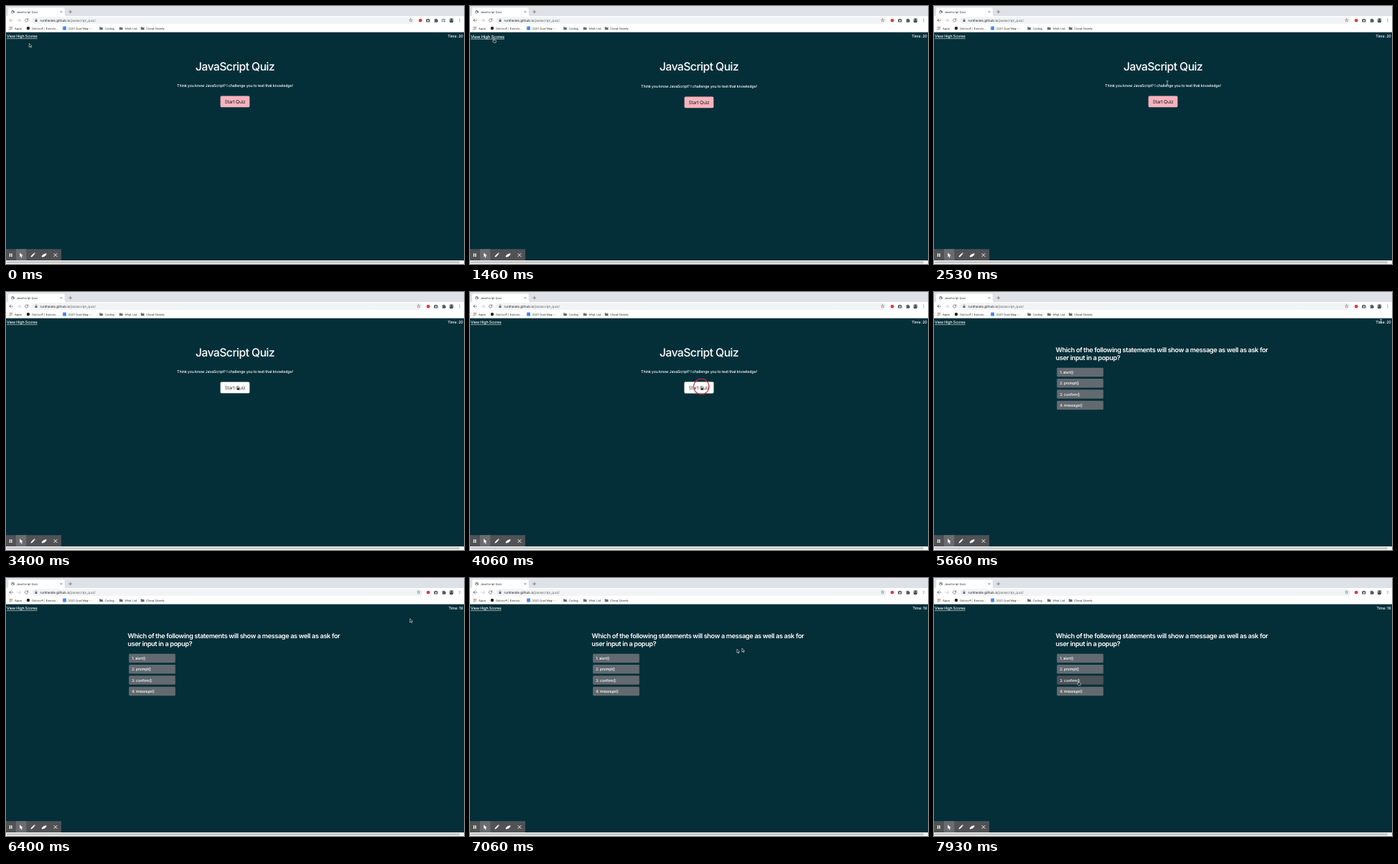
Recreate the animation shown at these times as an HTML page. Size 640 by 360 pixels, loop 8 s.

```html
<!DOCTYPE html>
<html lang="en">
<head>
<meta charset="utf-8">
<title>JavaScript Quiz</title>
<style>
  html, body { margin: 0; width: 100%; height: 100%; overflow: hidden; background: #042f39; }
  svg { display: block; width: 100%; height: 100%; }
  text { font-family: Inter, Roboto, sans-serif; text-rendering: geometricPrecision; white-space: pre; }
  .body { font-size: 5.33px; font-weight: 500; letter-spacing: -.026em; fill: #fff; }
  .ui { font-size: 4px; fill: #303337; }
  .line { fill: none; stroke: #5f6368; stroke-width: .7; stroke-linecap: round; stroke-linejoin: round; }
</style>
</head>
<body>
<svg id="stage" viewBox="0 0 640 360" xmlns="http://www.w3.org/2000/svg"></svg>
<script>
const LOOP = 8000;
const QUIZ_AT = 4200;
const $ = id => document.getElementById(id);

const text = (x, y, str, attrs = 'class="ui"') => `<text x="${x}" y="${y}" ${attrs}>${str}</text>`;
const rect = (x, y, w, h, fill, attrs = '') =>
  `<rect x="${x}" y="${y}" width="${w}" height="${h}" fill="${fill}" ${attrs}/>`;
const circle = (x, y, r, fill, attrs = '') =>
  `<circle cx="${x}" cy="${y}" r="${r}" fill="${fill}" ${attrs}/>`;
const line = (d, attrs = '') => `<path class="line" d="${d}" ${attrs}/>`;
const shape = (d, fill, attrs = '') => `<path d="${d}" fill="${fill}" ${attrs}/>`;

const appGrid = (x, y) => {
  const colors = ['#e8574a', '#e8574a', '#3fa65c', '#f0b429', '#4a86e8'];
  let out = '';
  for (let i = 0; i < 9; i++)
    out += rect(x + i % 3 * 1.5, y + Math.floor(i / 3) * 1.5, 1.1, 1.1, colors[i % colors.length]);
  return out;
};

const folder = x => shape(`M${x} 29.2h1.8l.6.7h2.4v3.4h-4.8z`, '#6b7075');

const star = (cx, cy, r) => {
  const pts = Array.from({ length: 10 }, (_, i) => {
    const a = -Math.PI / 2 + i * Math.PI / 5, k = i % 2 ? r * .45 : r;
    return `${(cx + k * Math.cos(a)).toFixed(2)} ${(cy + k * Math.sin(a)).toFixed(2)}`;
  });
  return line(`M${pts.join('L')}z`, 'style="stroke-width:.5"');
};

function browser() {
  return rect(0, 0, 640, 14, '#dee1e6') +
    shape('M1 14Q3 14 3 12V4.5Q3 2.5 5 2.5H80Q82 2.5 82 4.5V12Q82 14 84 14z', '#fff') +
    circle(9.5, 8.2, 2.3, '#5f6368') +
    shape('M8 7.2q1.2 0 1.4 1t1.3.8l-.5 1.2q-1.6 0-2.4-1.6zM9.6 6.5l1.4.5-.5.9z', '#fff') +
    text(14.4, 9.7, 'JavaScript Quiz') +
    line('M76.1 7.1l2.2 2.2m0-2.2l-2.2 2.2', 'style="stroke-width:.6"') +
    line('M88 8.2h4m-2-2v4') +
    rect(0, 14, 640, 23, '#fff') +
    line('M9.6 20H4.9m2.1-2.2L4.8 20l2.2 2.2', 'id="back"') +
    line('M15.9 20h4.7m-2.1-2.2l2.2 2.2-2.2 2.2', 'style="stroke:#b9bcbf"') +
    line('M30.3 18.6a2.2 2.2 0 1 0 .5 1.7M30.8 17.6v1.5h-1.5') +
    rect(36, 15.2, 546, 9.6, '#f1f3f4', 'id="pill" rx="4.8"') +
    rect(40.6, 19.4, 3, 2.5, '#5f6368', 'rx=".3"') +
    line('M41.2 19.4v-.8a.9.9 0 0 1 1.8 0v.8', 'style="stroke-width:.5"') +
    text(47.4, 21.6, 'runtheisle.github.io<tspan fill="#5f6368">/javascript_quiz/</tspan>',
      'font-size="4.67" letter-spacing="-.01" fill="#202124"') +
    '<g id="tools">' +
      star(576.6, 20, 2.4) +
      circle(590, 20.2, 2.4, '#dc3c42') +
      shape('M598 18.6h1.2l.6-.8h1.8l.6.8h1.2v3.8H598z', '#5f6368') + circle(600.7, 20.5, 1, '#fff') +
      shape('M609.5 18.5h1.4a.9.9 0 0 1 1.8 0h1.4v1.4a.9.9 0 0 1 0 1.8v1.1h-4.6v-1.2a.9.9 0 0 0 0-1.7z', '#55595d') +
    '</g>' +
    `<g id="media">${line('M608.8 18.4h4m-4 1.6h3m-3 1.6h2M613.2 18.4v3.2')}${circle(612.5, 21.7, .8, '#5f6368')}</g>` +
    circle(622.4, 20, 3.2, '#a3a7aa') + shape('M619.9 22a2.5 2.1 0 0 1 5 0 3.2 3.2 0 0 1-5 0z', '#45494d') +
    circle(622.6, 18.9, 1.3, '#45494d') +
    [18.2, 20, 21.8].map(y => circle(634, y, .55, '#5f6368')).join('') +
    appGrid(4.7, 28.9) + text(12, 32.5, 'Apps') +
    circle(31, 31, 2.2, '#222') + text(36, 32.5, 'Ostrivo® | Exercis...') +
    rect(79.4, 28.6, 4.8, 5, '#4285f4', 'rx=".5"') + text(87, 32.5, '2021 Goal Map -...') +
    folder(130.6) + text(138, 32.5, 'Coding') +
    folder(158.4) + text(166, 32.5, 'Wish List') +
    folder(188.4) + text(196, 32.5, 'Cheat Sheets');
}

const options = ['alert', 'prompt', 'confirm', 'message'];
const optionY = i => 105.7 + i * 15.33;

function page() {
  const big = 'fill="#fff" font-weight="500" font-size="15.8" letter-spacing="-.57" text-anchor="middle"';
  const ask = 'fill="#fff" font-weight="600" font-size="9.2" letter-spacing="-.37"';
  return rect(0, 36.6, 640, 318.4, '#042f39') +
    text(1, 44.2, 'View High Scores', 'id="link" class="body" text-decoration="underline"') +
    text(638.6, 44.2, '', 'id="clock" class="body" text-anchor="end"') +
    '<g id="intro">' +
      text(320, 89.6, 'JavaScript Quiz', big) +
      text(320, 112.7, 'Think you know JavaScript? I challenge you to test that knowledge!',
        'class="body" text-anchor="middle"') +
      rect(299.6, 125.5, 40.8, 15.8, '#f8b3bd', 'id="start" rx="1.6"') +
      text(320, 135.7, 'Start Quiz', 'id="label" font-size="6.67" letter-spacing="-.2" text-anchor="middle"') +
    '</g><g id="quiz">' +
      text(170, 83.6, 'Which of the following statements will show a message as well as ask for', ask) +
      text(170, 94.8, 'user input in a popup?', ask) +
      options.map((name, i) =>
        rect(171.67, optionY(i), 65, 12.5, '#626a6f', `id="opt${i}" rx="1.3"`) +
        text(175.67, optionY(i) + 8.2, `${i + 1}. ${name}()`, 'class="body"')).join('') +
    '</g>';
}

function recorder() {
  return rect(0, 355, 640, 5, '#f6f7f7') + rect(.7, 356.2, 633.3, 2.5, '#c1c1c1', 'rx="1.2"') +
    rect(0, 339.2, 77.2, 15.8, '#505255') + rect(14, 339.2, 14.4, 15.8, '#6a6c6f') +
    rect(4.8, 345.2, 1.3, 4.8, '#fff') + rect(7.2, 345.2, 1.3, 4.8, '#fff') +
    shape('M19.3 344.3l4.4 4.1-2.1.2 1.1 2.3-1 .5-1.1-2.4-1.3 1.3z', '#fff') +
    shape('M34.6 350.4l.4-1.7 3.6-3.6 1.4 1.4-3.6 3.6zM39 344.7l.6-.6 1.4 1.4-.6.6z', '#fff') +
    shape('M50 348.6l3-2.7 3.6-.9-.4 2.2-2.8 2.6-3.4.6z', '#fff') +
    line('M67 345.4l4.2 4.2m0-4.2l-4.2 4.2', 'style="stroke:#fff;stroke-width:.9"');
}

const arrow = 'M0 0L0 5.1L1.2 4L2 5.8L2.9 5.4L2.1 3.7L3.7 3.6Z';
const edge = 'stroke="#fff" stroke-width=".55" stroke-linejoin="round"';
const pointers = {
  arrow: shape(arrow, '#111', edge),
  hand: shape('M-.6 .4a.6.6 0 0 1 1.2 0V2l2 .5q.7.3.6 1L2.7 5.5H-.3L-1.9 3.3q.2-.9 1.3-.2z', '#222', edge),
  beam: line('M-1.1-2.7Q0-2.7 0-2Q0-2.7 1.1-2.7M0-2V2M-1.1 2.7Q0 2.7 0 2Q0 2.7 1.1 2.7',
    'style="stroke:#e3e6e7;stroke-width:.65"')
};

$('stage').innerHTML = browser() + page() + recorder() +
  circle(323.3, 132, 10.8, 'none', 'id="ring" stroke="#d92b35" stroke-width="1.1"') +
  `<g id="ghost">${pointers.arrow}</g><g id="cursor">` +
  Object.entries(pointers).map(([kind, art]) => `<g id="${kind}">${art}</g>`).join('') + '</g>';

// Pointer hotspot: time, x, y
const path = [
  [0, 32.4, 52.3], [60, 32.4, 52.3], [420, 33.4, 45.6], [1480, 33.4, 45.6],
  [2050, 215, 84], [2500, 326, 107.2], [2560, 326, 107.2], [2860, 324, 131],
  [3730, 323.4, 131.6], [4440, 323.4, 131.6], [5330, 622, 43], [5600, 624.6, 40.8],
  [6180, 624.6, 40.8], [6700, 470, 82], [7030, 380, 98], [7060, 373, 99.3],
  [7760, 202, 144.2], [LOOP, 202, 144.2]
];

function pointerAt(t) {
  const i = path.findIndex((p, n) => n && t <= p[0]);
  const [t0, x0, y0] = path[i - 1], [t1, x1, y1] = path[i];
  const u = (t - t0) / (t1 - t0), k = u * u * (3 - 2 * u);
  return [x0 + (x1 - x0) * k, y0 + (y1 - y0) * k];
}

const inside = ([x, y], [l, t, r, b]) => x >= l && x <= r && y >= t && y <= b;
const set = (id, attrs) => { for (const k in attrs) $(id).setAttribute(k, attrs[k]); };
const show = (id, on) => set(id, { visibility: on ? 'inherit' : 'hidden' });
const move = (id, [x, y]) => set(id, { transform: `translate(${x.toFixed(2)} ${y.toFixed(2)})` });

function render(t) {
  const quiz = t >= QUIZ_AT, recording = t >= 330;
  const at = pointerAt(t);
  const onLink = inside(at, [1, 38, 48, 47.5]);
  const onStart = !quiz && inside(at, [299, 125, 341, 141]);
  const over = options.findIndex((_, i) => quiz && inside(at, [171.67, optionY(i), 236.67, optionY(i) + 12.5]));
  const words = [[617, 38, 640, 47],
    ...(quiz ? [[170, 74, 469, 97]] : [[265, 77, 375, 93], [239, 106, 401, 115]])];
  const kind = onLink || onStart || over >= 0 ? 'hand' : words.some(b => inside(at, b)) ? 'beam' : 'arrow';

  set('back', { style: `stroke:${recording ? '#50545a' : '#a9adb1'}` });
  set('pill', { width: recording ? 546 : 535 });
  move('tools', [recording ? 0 : -11, 0]);
  show('media', !recording);

  set('link', { style: onLink ? 'font-size:5.87px' : '', y: onLink ? 44.8 : 44.2 });
  move('intro', [0, onLink ? .9 : 0]);
  show('intro', !quiz);
  show('quiz', quiz);
  set('start', {
    fill: onStart ? '#fff' : '#f8b3bd',
    stroke: t > 3960 && !quiz ? 'rgba(190,196,200,.6)' : 'none'
  });
  set('label', { fill: onStart ? '#4a4347' : '#212529' });
  options.forEach((_, i) => set('opt' + i, { fill: i === over ? '#4b5358' : '#626a6f' }));
  $('clock').textContent = 'Time: ' + (20 - (t >= 6350) - (t >= 7400));

  show('ring', t >= 3940 && t < 4240);
  set('ring', { r: Math.min(10.8, 4 + (t - 3940) / 13) });
  move('cursor', at);
  for (const k in pointers) show(k, k === kind);
  show('ghost', t >= 7050 && t < 7130);
  move('ghost', pointerAt(Math.max(0, t - 30)));
}

const begin = performance.now();
function tick() {
  render((performance.now() - begin) % LOOP);
  requestAnimationFrame(tick);
}
tick();
</script>
</body>
</html>
```
